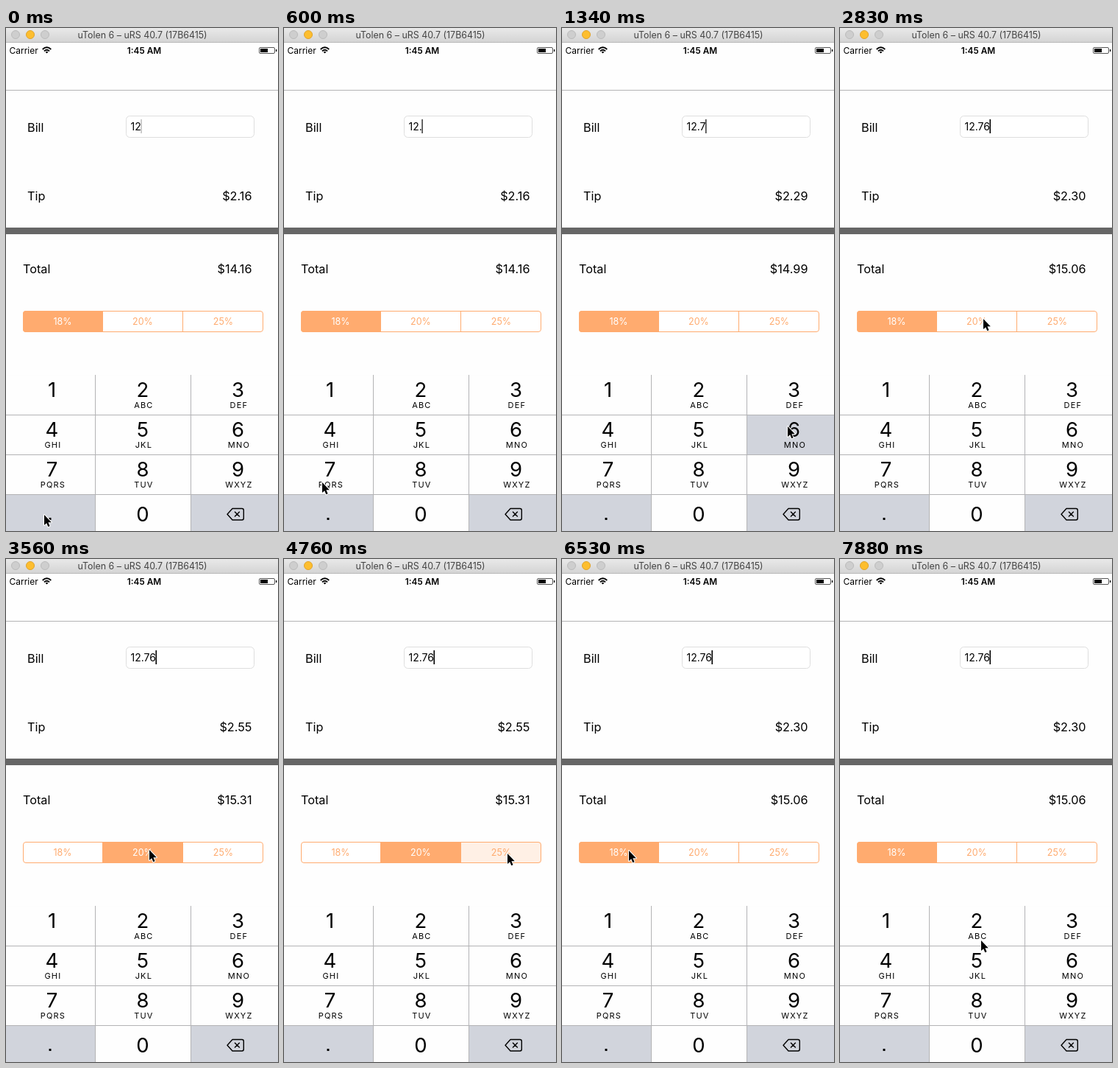
These frames come from a looping animation (370x683 px, 8000 ms). An HTML page:

```html
<!DOCTYPE html>
<html lang="en">
<head>
<meta charset="utf-8">
<title>Tip calculator</title>
<style>
  html, body { margin: 0; width: 100%; height: 100%; overflow: hidden; background: #fefefe; }
  svg { display: block; width: 370px; height: 683px; font: 16.25px Inter, "Open Sans", sans-serif; }
  .mid { text-anchor: middle; }
  .end { text-anchor: end; }
  .digit { font-size: 27.5px; }
  .letters { font-size: 11px; letter-spacing: 1.2px; }
  .rate { font-size: 12.5px; }
  .line { stroke: #b3b3b5; }
</style>
</head>
<body>
<svg viewBox="0 0 370 683">
  <defs>
    <linearGradient id="bar" x2="0" y2="1">
      <stop stop-color="#e9e9e9"/><stop offset="1" stop-color="#d3d3d3"/>
    </linearGradient>
    <clipPath id="round"><rect x="23" y="384" width="327" height="29" rx="4"/></clipPath>
  </defs>

  <!-- window title -->
  <rect width="370" height="20" fill="url(#bar)"/>
  <path d="M0 19.5H370" stroke="#b9b9b9"/>
  <g fill="#cecece" stroke="#bbb">
    <circle cx="13" cy="9" r="5.5"/>
    <circle cx="33" cy="9" r="5.5" fill="#fdbe2f" stroke="#e0a32a"/>
    <circle cx="53" cy="9" r="5.5"/>
  </g>
  <text class="mid" x="185.5" y="14" font-size="12.4" fill="#444">uTolen 6 – uRS 40.7 (17B6415)</text>

  <!-- status bar -->
  <text x="4.5" y="34.5" font-size="12">Carrier</text>
  <g fill="none" stroke="#000" stroke-width="1.8">
    <path d="M49.7 29Q55.5 23.6 61.3 29M51.9 31.4Q55.5 28 59.1 31.4"/>
    <path d="M53.6 32.6Q55.5 30.9 57.4 32.6L55.5 34.6Z" fill="#000" stroke="none"/>
  </g>
  <text class="mid" x="188" y="34.5" font-size="11.8" font-weight="600">1:45 AM</text>
  <rect x="344.5" y="26.5" width="21" height="8" rx="1.5" fill="none" stroke="#555"/>
  <path d="M346 28h10v5h-10zM367 29h1.3v3h-1.3z"/>

  <!-- form -->
  <path d="M0 84.5H370" class="line"/>
  <text x="29" y="140.5">Bill</text>
  <rect x="163.5" y="119.5" width="174" height="29" rx="5" fill="#fff" stroke="#dedede"/>
  <text id="bill" x="169.5" y="139" font-size="14"></text>
  <rect id="caret" y="124" width="1.6" height="19"/>
  <text x="29" y="233.5">Tip</text>
  <text id="tip" class="end" x="334.5" y="233.5"></text>
  <rect y="271" width="370" height="9" fill="#666"/>
  <text x="23" y="332.5">Total</text>
  <text id="total" class="end" x="334.5" y="332.5"></text>

  <g id="rates"></g>
  <g id="keys"></g>
  <path id="cursor" d="M0 0V14L3.2 11.2 5.3 16.3 7.6 15.3 5.4 10.3H9.8Z"
        stroke="#fff" stroke-width="2" stroke-linejoin="round" paint-order="stroke"/>
</svg>
<script>
const $ = id => document.getElementById(id);
const LOOP = 8000, STEP = 148.6;
const ORANGE = '#ffab6f', GREY = '#d1d4dc';
const rates = [18, 20, 25], edges = [23, 131.5, 240.5, 350];
const colX = [0, 121.5, 251.5, 370], midX = [62.5, 186, 315.5];
const letters = ['', 'ABC', 'DEF', 'GHI', 'JKL', 'MNO', 'PQRS', 'TUV', 'WXYZ'];

// Each list holds [step, value...]; a value stays until the next entry.
const path = [
  [0, 52, 661], [3, 52, 645], [4, 52, 617], [7, 150, 592], [8, 285, 548], [9, 307, 541],
  [14, 300, 522], [15, 262, 455], [16, 217, 406], [17, 201, 396], [19, 195, 395],
  [30, 225, 397], [31, 290, 400], [32, 304, 400],
  [36, 290, 399], [37, 240, 397], [38, 170, 396], [39, 126, 396], [40, 110, 396], [41, 91, 396],
  [50, 104, 412], [51, 148, 463], [52, 181, 506], [53, 192, 518]
];
const typed = [[0, '12'], [2, '12.'], [6, '12.7'], [10, '12.76']];
const chosen = [[0, 0], [21, 1], [33, 2], [43, 0]];
const keyPress = { 1: 9, 5: 6, 9: 5 };
const ratePress = { 20: 1, 32: 2, 42: 0 };

const at = (list, k) => list.filter(e => e[0] <= k).pop();

$('rates').innerHTML = '<g clip-path="url(#round)">' + rates.map((r, i) =>
  `<rect id="seg${i}" x="${edges[i]}" y="384" width="${edges[i + 1] - edges[i]}" height="29"/>`).join('') +
  `</g><g fill="none" stroke="${ORANGE}"><rect x="23.5" y="384.5" width="326" height="28" rx="3.5"/>` +
  '<path d="M131.5 384V413M240.5 384V413"/></g>' + rates.map((r, i) =>
  `<text id="rate${i}" class="mid rate" x="${[77, 186, 295.5][i]}" y="403">${r}%</text>`).join('');

function keypad() {
  let out = '';
  for (let i = 0; i < 12; i++) {
    const c = i % 3, row = i / 3 | 0, y = 471 + row * 54;
    out += `<rect id="key${i}" x="${colX[c]}" y="${y + .5}" width="${colX[c + 1] - colX[c]}" height="54"/>`;
    if (i < 9) out += `<text class="mid digit" x="${midX[c]}" y="${y + 30}">${i + 1}</text>` +
      `<text class="mid letters" x="${midX[c] + 1.4}" y="${y + 45}">${letters[i]}</text>`;
  }
  return out + '<text class="mid digit" x="186" y="670">0</text>' +
    '<rect x="58.5" y="665" width="3" height="3" rx=".6"/>' +
    '<path class="line" fill="none" d="M121.5 471V683M251.5 471V683M0 525.5H370M0 579.5H370M0 633.5H370"/>' +
    '<path fill="none" stroke="#000" stroke-width="1.4" stroke-linejoin="round" ' +
    'd="M308 652.5H321Q323.3 652.5 323.3 655V665.5Q323.3 668 321 668H308L301 660.2ZM311 656.8L317.8 663.6M317.8 656.8L311 663.6"/>';
}
$('keys').innerHTML = keypad();

function caretAlpha(k) {
  if (k < 1) return .25;
  if (k < 10) return .75;
  if (k < 14) return 1;
  const p = (k + 16) % (20 / 3);
  return p > 5.9 ? 1 : Math.max(0, Math.min(1, (3.4 - p) / .9));
}

const money = v => '$' + v.toFixed(2);

function draw(now) {
  const k = Math.floor((now % LOOP + 10) / STEP);
  const text = at(typed, k)[1], pick = at(chosen, k)[1];
  const bill = parseFloat(text), tip = bill * rates[pick] / 100;
  $('bill').textContent = text;
  $('tip').textContent = money(tip);
  $('total').textContent = money(bill + tip);
  $('caret').setAttribute('x', 169 + $('bill').getComputedTextLength());
  $('caret').setAttribute('opacity', caretAlpha(k));

  rates.forEach((r, i) => {
    $('seg' + i).setAttribute('fill', i === pick ? ORANGE : ratePress[k] === i ? '#fff0e5' : '#fff');
    $('rate' + i).setAttribute('fill', i === pick ? '#fff' : ORANGE);
  });
  for (let i = 0; i < 12; i++) {
    const grey = (i === 9 || i === 11) !== (keyPress[k] === i);
    $('key' + i).setAttribute('fill', grey ? GREY : '#fefefe');
  }
  const [, x, y] = at(path, k);
  $('cursor').setAttribute('transform', `translate(${x} ${y})`);
}

const start = performance.now();
function tick() {
  draw(performance.now() - start);
  requestAnimationFrame(tick);
}
tick();
</script>
</body>
</html>
```
